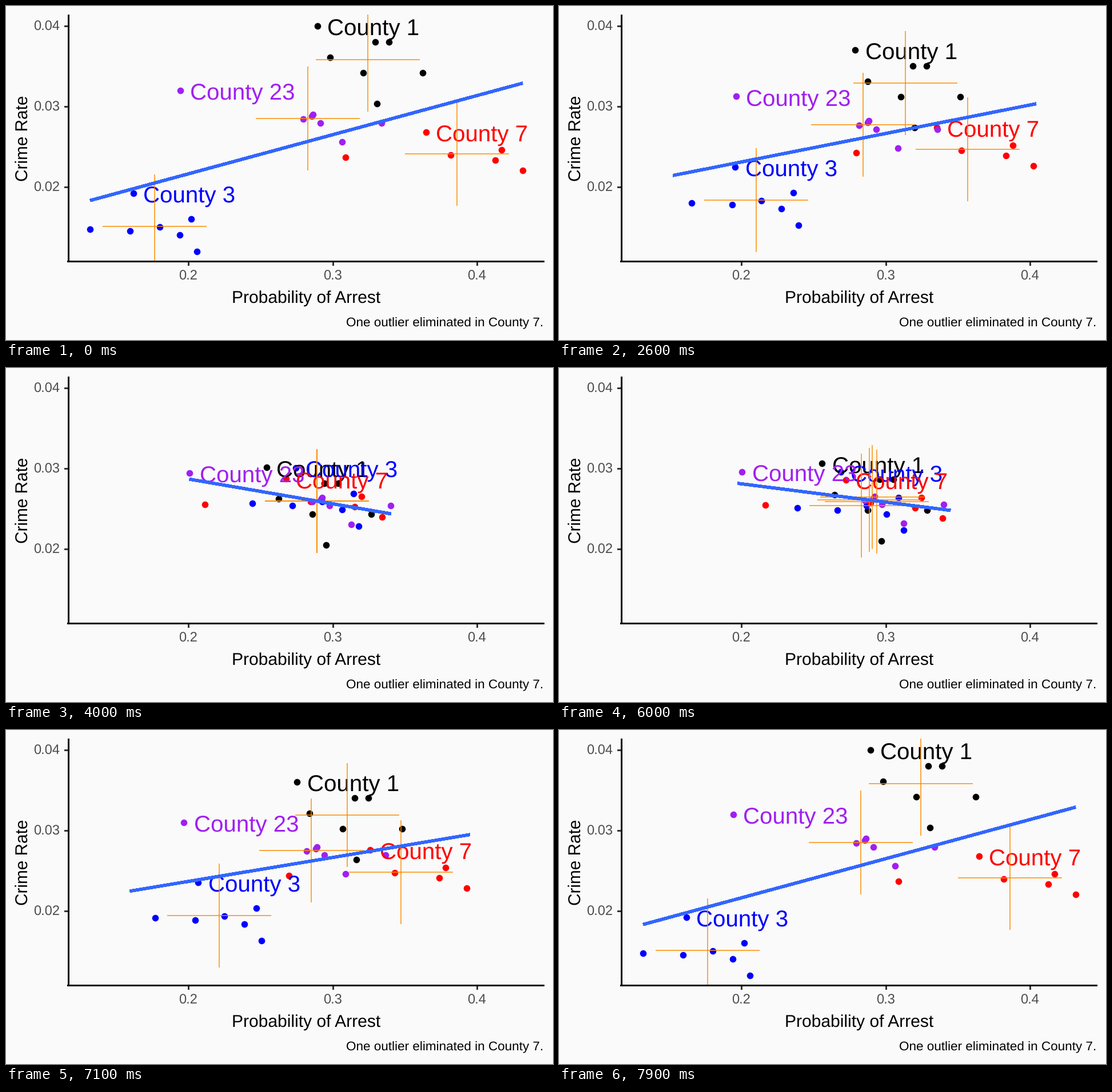
Recreate the animation shown at these times as a matplotlib script. Size 957x585 px, loop 8 s.

```python
import numpy as np
import matplotlib.pyplot as plt
from matplotlib.animation import FuncAnimation

plt.rcParams["font.family"] = "Liberation Sans"
plt.rcParams["text.hinting"] = "none"

W, H, DPI = 957, 585, 64
PX = 72 / DPI  # points per pixel
LEFT, RIGHT, TOP, BOTTOM = 109, 940, 15, 446
HOLD = STEPS = 20


def pixel_axes(x0, x1, y0, y1):
    ax = fig.add_axes([x0 / W, 1 - y1 / H, (x1 - x0) / W, (y1 - y0) / H])
    ax.set_xlim(x0, x1)
    ax.set_ylim(y1, y0)
    ax.axis("off")
    return ax


fig = plt.figure(figsize=(W / DPI, H / DPI), dpi=DPI, facecolor="#FAFAFA")
panel = pixel_axes(LEFT, RIGHT, TOP, BOTTOM)
frame = pixel_axes(0, W, 0, H)


def rule(xs, ys, color):
    frame.plot(xs, ys, color=color, lw=3 * PX, antialiased=False,
               solid_capstyle="butt")


def write(x, y, text, size, color="black", **kw):
    frame.text(x, y, text, size=size * PX, color=color, va="baseline", **kw)


for i in range(3):
    x, y = 319 + 252.7 * i, 316.5 - 141 * i
    rule([102, 108], [y, y], "#333333")
    rule([x, x], [447, 454], "#333333")
    write(94, y + 8.5, f"{0.02 + 0.01 * i:.2f}", 23.6, "#4D4D4D", ha="right")
    write(x - 0.5, 480, f"{0.2 + 0.1 * i:.1f}", 23.6, "#4D4D4D", ha="center")
rule([108.5, 108.5], [TOP, BOTTOM + 2], "black")
rule([LEFT - 2, RIGHT + 1], [446.5, 446.5], "black")

write(525, 520, "Probability of Arrest", 30, ha="center")
write(940.5, 561.5, "One outlier eliminated in County 7.", 22.45, ha="right")
write(39, 232, "Crime Rate", 29.7, ha="center", rotation=90,
      rotation_mode="anchor")


class County:
    """One labelled dot and a cloud of others, balanced around the mean."""

    def __init__(self, name, color, first, mean, reach, start, swing, peak,
                 turn=np.pi, size=7):
        self.mean = np.array(mean)
        # dots bunch up near v = 0 and swing up and down around the peak
        v = np.linspace(start, 1, size - 1)
        j = np.arange(size - 1) - peak
        cloud = np.column_stack([
            reach * np.sign(v) * np.abs(v) ** 2.5,
            swing * np.cos(turn * j) * 0.5 ** np.abs(j)])
        centre = (size * self.mean - first) / (size - 1)
        self.points = np.vstack([first, cloud - cloud.mean(axis=0) + centre])
        self.dots, = panel.plot([], [], "o", color=color, ms=11.6 * PX,
                                mew=0, antialiased=False, zorder=2)
        self.label = panel.text(0, 0, name, color=color, size=40.3 * PX,
                                va="baseline", zorder=3)

    def place(self, p):
        shift = p * (grand - self.mean)
        self.dots.set_data(*(self.points + shift).T)
        self.label.set_position(self.points[0] + shift + (17.5, 17))
        return self.mean + shift


counties = [
    County("County 1", "black", first=(545, 35), mean=(633, 93.6),
           reach=81, start=-1, swing=72, peak=3),
    County("County 3", "blue", first=(223, 328), mean=(259.8, 386.3),
           reach=-188, start=0.15, swing=38, peak=0),
    County("County 7", "red", first=(735, 220.5), mean=(788.9, 259.3),
           reach=-273, start=-0.45, swing=24, peak=0, size=6),
    County("County 23", "#A020F0", first=(305, 147.5), mean=(527.5, 196.6),
           reach=121, start=-0.45, swing=40, peak=4, turn=1.2),
]
grand = np.average([c.mean for c in counties], axis=0,
                   weights=[len(c.points) for c in counties])

crosses, = panel.plot([], [], "+", color="#FF8C00", ms=182 * PX,
                      mew=1.5 * PX, zorder=4)
trend, = panel.plot([], [], color="#3366FF", lw=4.8 * PX, antialiased=False,
                    solid_capstyle="butt", zorder=5)


def trend_ends(groups, slope):
    xs = np.concatenate([g[:, 0] for g in groups])
    ends = np.array([xs.min(), xs.max()])
    return np.column_stack([ends, grand[1] + slope * (ends - grand[0])])


raw_trend = trend_ends([c.points for c in counties], -0.2715)
centred_trend = trend_ends([c.points - c.mean + grand for c in counties],
                           0.172)


def progress(i):
    """0 for the raw data, 1 when every county sits on the grand mean."""
    if i < 2 * HOLD:
        return max(0, i - HOLD) / STEPS
    return 1 - max(0, i - 3 * HOLD + 1) / STEPS


def draw(i):
    p = progress(i)
    crosses.set_data(*np.array([c.place(p) for c in counties]).T)
    trend.set_data(*(raw_trend + p * (centred_trend - raw_trend)).T)
    return [crosses, trend]


anim = FuncAnimation(fig, draw, frames=80, interval=100, repeat=True,
                     repeat_delay=0, init_func=lambda: draw(0))
plt.show()
```
